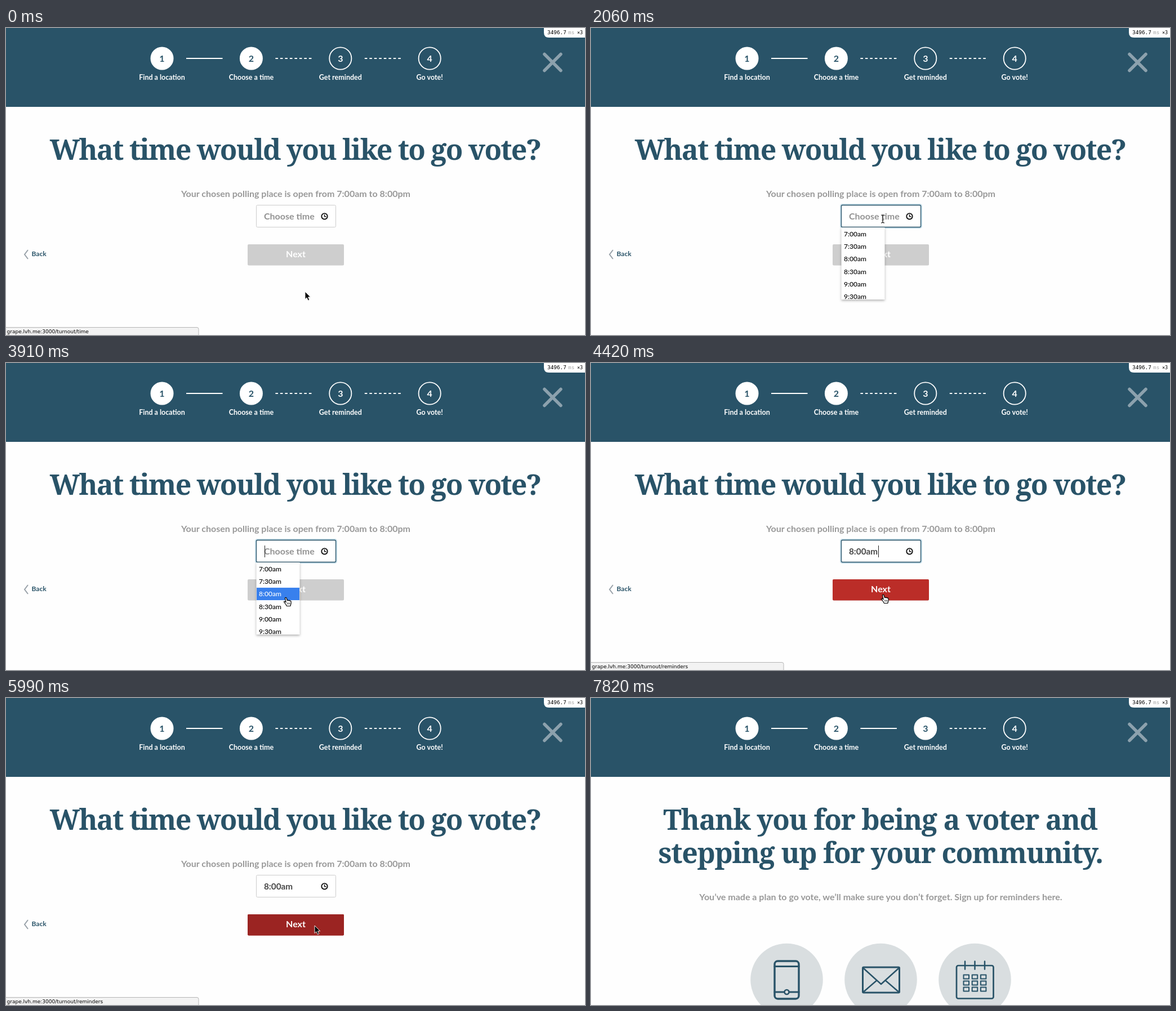
Write an HTML page that moves like this. It is 1028 px wide and 545 px high and loops after 9.76 s.

```html
<!DOCTYPE html>
<html lang="en">
<head>
<meta charset="utf-8">
<title>Plan your vote</title>
<style>
  html, body { margin: 0; width: 100%; height: 100%; overflow: hidden; background: #fefefe; }
  svg { display: block; width: 100%; height: 100%; font: 700 16px Lato, sans-serif; }
  .title { font: 700 50px "Noto Serif", serif; letter-spacing: -1.3px; fill: #295368; }
  .tight { letter-spacing: -1.75px; }
  .mid { text-anchor: middle; }
  .label { font-size: 12.5px; fill: #fff; }
  .small { font-size: 12px; }
  .mono { font: 9.4px "DejaVu Sans Mono", monospace; }
  .status { font: 9px "DejaVu Sans", sans-serif; }
  .icon { fill: none; stroke: #295368; stroke-width: 3; stroke-linejoin: round; stroke-linecap: round; }
  #list { filter: drop-shadow(0 2px 2px rgba(0, 0, 0, .3)); }
</style>
</head>
<body>
<svg viewBox="0 0 1028 545">
  <rect width="1028" height="140" fill="#295368"/>
  <g id="steps"></g>
  <path d="M956 46.500l29 29m0-29l-29 29" stroke="#8ca1ad" stroke-width="5.500" stroke-linecap="round"/>
  <path d="M955 0h73v17h-64q-9 0-9-9z" fill="#fff"/>
  <g class="mono">
    <text x="961" y="11">3496.7</text>
    <text x="998" y="11" fill="#aaa">ms</text>
    <text x="1014" y="11" font-size="8.500">×3</text>
  </g>

  <g id="timePage">
    <text class="title tight mid" x="513.500" y="234">What time would you like to go vote?</text>
    <text class="mid" x="514.500" y="300" fill="#999">Your chosen polling place is open from 7:00am to 8:00pm</text>
    <path d="M39 394l-6 8 6 8" fill="none" stroke="#98a1a8" stroke-width="2"/>
    <text class="small" x="45.500" y="404.500" fill="#295368">Back</text>

    <rect id="glow" x="444.500" y="314.500" width="141" height="39" rx="2" fill="none" stroke="#c3dce8" stroke-width="5"/>
    <rect x="444.500" y="314.500" width="141" height="39" rx="2" fill="#fff" stroke="#ccc"/>
    <rect id="focusRing" x="444.500" y="314.500" width="141" height="39" rx="2" fill="none" stroke="#295368" stroke-width="1.300"/>
    <text id="hint" x="458" y="339.500" fill="#939393">Choose time</text>
    <text id="value" x="458" y="339.500" fill="#484848" font-size="15.300">8:00am</text>
    <rect id="caret" y="324" width="1" height="21" fill="#222"/>
    <circle cx="565.500" cy="334.300" r="5.200" fill="none" stroke="#111" stroke-width="1.900"/>
    <path d="M565.500 331v3.800h3" fill="none" stroke="#111" stroke-width="1.400"/>

    <g id="button"></g>
    <text class="mid" x="514.500" y="407" fill="#fff">Next</text>
    <g id="list">
      <clipPath id="listClip"><rect x="444.500" y="354" width="77" height="128"/></clipPath>
      <rect x="444.500" y="354" width="77" height="128" fill="#fff"/>
      <g id="rows" clip-path="url(#listClip)"></g>
    </g>
  </g>

  <g id="thanksPage">
    <text class="title mid" x="513.500" y="234">Thank you for being a voter and</text>
    <text class="title mid" x="514" y="293">stepping up for your community.</text>
    <text class="mid" x="514.500" y="359" fill="#999">You’ve made a plan to go vote, we’ll make sure you don’t forget. Sign up for reminders here.</text>
    <g fill="#d9dee0">
      <circle cx="347.500" cy="500" r="64.300"/>
      <circle cx="514.500" cy="500" r="64.300"/>
      <circle cx="681.500" cy="500" r="64.300"/>
    </g>
    <g id="phone" class="icon">
      <rect x="326" y="467" width="43" height="67" rx="5.500" stroke-width="3.400"/>
      <path d="M326 476.500h43M326 522h43"/>
      <circle cx="347.500" cy="522" r="4" fill="#d9dee0" stroke-width="2.700"/>
    </g>
    <g id="lateIcons" class="icon">
      <rect x="482.500" y="478" width="65" height="45" rx="1.500"/>
      <path d="M484 480l31 28 31-28M484 521.500l22-19M546 521.500l-22-19" stroke-width="2.500"/>
      <rect x="649" y="475" width="65.500" height="58.500" rx="3" stroke-width="2.700"/>
      <path d="M664 467.500v14M681.500 467.500v14M699 467.500v14" stroke-width="2.500"/>
      <g id="days" stroke-width="2"></g>
    </g>
  </g>

  <g id="status">
    <path d="M-1 531.500h340q3 0 3 3v12h-343z" fill="#f3f3f3" stroke="#b5b5b5"/>
    <text id="address" class="status" x="1.500" y="542.300"></text>
  </g>

  <g id="cursor">
    <path id="arrow" d="M0 0v13.500l3-2.800 2.300 5 2.400-1-2.200-4.900h4.200z" fill="#000" stroke="#fff" stroke-width=".9"/>
    <path id="beam" d="M-3-7q3 0 3 2q0-2 3-2M0-5v10M-3 7q3 0 3-2q0 2 3 2M-1.500 2h3" fill="none" stroke="#222" stroke-width="1.200"/>
    <g id="hand" stroke="#000" stroke-linejoin="round">
      <path d="M-1.600 1.200q1.300-1.800 2.700 0l1.200 4.300q1.500-1 2.400.3q1.500-.8 2.300.5q1.800-.5 2.100 1.300v3.300l-1.300 4.600h-6.300l-1.700-3-3.300-4.300q.3-1.800 2.200-.6l1.400 1.300z" fill="#fff" stroke-width="1.200"/>
      <path d="M2.600 9.500v3M4.700 9.500v3M6.700 9.500v3" stroke-width=".8"/>
    </g>
  </g>
</svg>
<script>
const LOOP = 9760, PICK = 3960, PRESS = 5810, NEXT_PAGE = 6050;
const ROW_TOP = 354.3, ROW_H = 22.3;
const $ = id => document.getElementById(id);
const fade = (id, v) => $(id).setAttribute('opacity', v);
const show = (id, on) => $(id).style.display = on ? '' : 'none';
const ramp = (t, a, b) => Math.min(1, Math.max(0, (t - a) / (b - a)));

// Cursor hotspot: time, x, y
const path = [
  [500, 531, 468], [800, 513, 415], [1020, 504, 366], [1230, 518, 339],
  [2360, 518, 339], [2800, 507, 384], [3160, 498, 421], [3220, 497, 427],
  [3510, 497, 427], [3740, 497, 416], [3910, 497, 416], [4420, 519, 411],
  [4760, 530, 405], [4990, 530, 405], [5220, 548, 404], [6670, 548, 404],
  [7060, 831, 429], [7540, 831, 429], [7820, 948, 552]
];

function cursorAt(t) {
  const i = path.findIndex(p => p[0] > t);
  if (i === 0) return path[0].slice(1);
  if (i < 0) return path[path.length - 1].slice(1);
  const [t0, x0, y0] = path[i - 1], [t1, x1, y1] = path[i];
  const k = ramp(t, t0, t1);
  return [x0 + (x1 - x0) * k, y0 + (y1 - y0) * k];
}

const names = ['Find a location', 'Choose a time', 'Get reminded', 'Go vote!'];
function drawSteps(done) {
  $('steps').innerHTML = names.map((name, i) => {
    const x = 277 + i * 158.4, on = i < done;
    const dash = i + 1 < done ? '' : 'stroke-dasharray="4.5 4"';
    const line = i < 3 ? `<path d="M${x + 43} 54h64.500" stroke="#fff" stroke-width="2" ${dash}/>` : '';
    return `<circle cx="${x}" cy="54" r="19.600" stroke="#fff" stroke-width="1.800" fill="${on ? '#fff' : 'none'}"/>
      <text class="mid" x="${x}" y="60" fill="${on ? '#295368' : '#fff'}">${i + 1}</text>
      <text class="mid label" x="${x}" y="92">${name}</text>${line}`;
  }).join('');
}

$('button').innerHTML = ['#cecece', '#bb2d28', '#9b2422'].map((c, i) =>
  `<rect id="fill${i}" x="429" y="384" width="171" height="37.500" rx="2" fill="${c}"/>`).join('');

$('rows').innerHTML = ['7:00', '7:30', '8:00', '8:30', '9:00', '9:30'].map((s, i) => {
  const y = ROW_TOP + i * ROW_H;
  return `<rect x="445" y="${y}" width="76" height="${ROW_H}"/>
    <text class="small" font-weight="500" x="449" y="${y + 15.3}">${s}am</text>`;
}).join('');
const bars = $('rows').querySelectorAll('rect'), times = $('rows').querySelectorAll('text');

$('days').innerHTML = [...Array(9).keys()].map(i =>
  `<rect x="${661.5 + i % 3 * 15.2}" y="${491.5 + (i / 3 | 0) * 11}" width="9.500" height="7"/>`).join('');

let stepsDone = 0;
function draw(t) {
  const thanks = t >= NEXT_PAGE, picked = t >= PICK;
  const open = t >= 1560 && !picked;
  const [x, y] = cursorAt(t);

  if (stepsDone !== (thanks ? 3 : 2)) drawSteps(stepsDone = thanks ? 3 : 2);
  show('timePage', !thanks);
  show('thanksPage', thanks);
  show('phone', t >= 6110);
  show('lateIcons', t >= 6310);

  const focus = ramp(t, 1430, 1700) * (1 - ramp(t, PRESS - 40, 5930)) * (t >= 1470);
  fade('glow', focus);
  fade('focusRing', focus);
  show('hint', !picked);
  show('value', picked);
  const since = t - (picked ? PICK : 1560);
  show('caret', since >= 0 && since % 1000 < 500 && t < PRESS);
  $('caret').setAttribute('x', picked ? 510 : 459);
  fade('fill1', ramp(t, PICK, 4160));
  fade('fill2', ramp(t, PRESS - 60, 5930));

  show('list', open);
  const hover = open ? Math.floor((y - ROW_TOP) / ROW_H) : -1;
  bars.forEach((b, i) => b.setAttribute('fill', i === hover ? '#3880ed' : '#fff'));
  times.forEach((s, i) => s.setAttribute('fill', i === hover ? '#fff' : '#000'));

  const first = t < 170 ? 1 : t < 320 ? .5 : 0;
  fade('status', first || ramp(t, 4060, 4240) * (1 - ramp(t, 6720, 6960)));
  $('address').textContent = 'grape.lvh.me:3000/turnout/' + (t < 1000 ? 'time' : 'reminders');

  const kind = y > 314 && y < 354 ? 'beam'
    : (open && hover >= 0) || (picked && t < 5930) ? 'hand' : 'arrow';
  for (const k of ['arrow', 'beam', 'hand']) show(k, k === kind);
  show('cursor', t < 7820);
  $('cursor').setAttribute('transform', `translate(${x} ${y})`);
}

let start;
function tick(now) {
  start ??= now;
  draw((now - start) % LOOP);
  requestAnimationFrame(tick);
}
draw(0);
requestAnimationFrame(tick);
</script>
</body>
</html>
```
